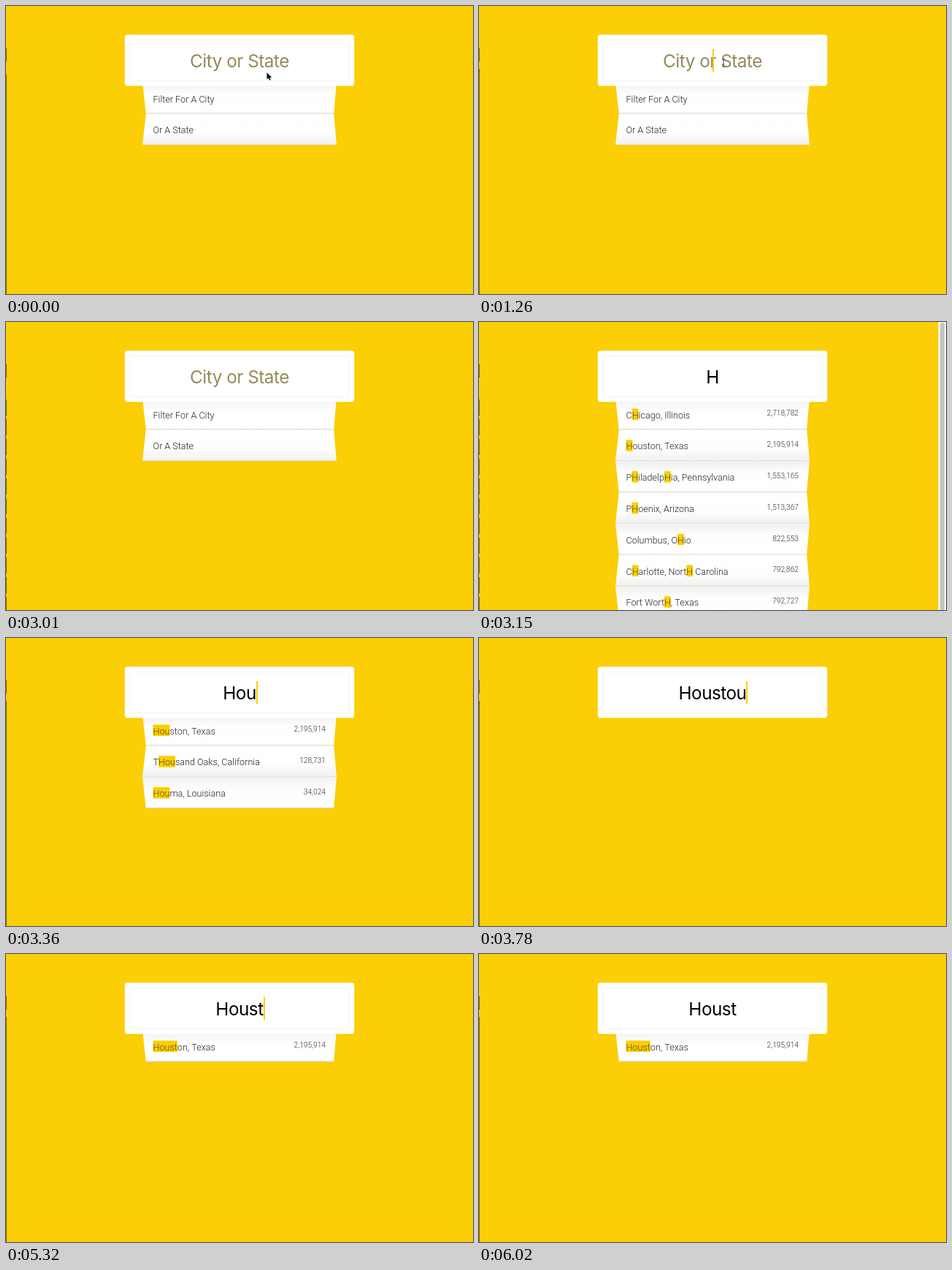
An HTML page with a canvas that plays this animation: 640 by 394 pixels, repeating every 6090 ms.

```html
<!DOCTYPE html>
<html lang="en">
<head>
<meta charset="utf-8">
<title>City or State</title>
<style>
  html, body { margin: 0; width: 100%; height: 100%; overflow: hidden; background: #fbce05; }
  canvas { display: block; width: 640px; height: 394px; }
</style>
</head>
<body>
<canvas id="stage" width="640" height="394"></canvas>
<script>
const ctx = document.getElementById('stage').getContext('2d');
const LOOP = 6090;
const YELLOW = '#fbce05';
const INPUT_FONT = '24.3px Inter, sans-serif';
const ROW_FONT = '300 12.6px Roboto, sans-serif';
const COUNT_FONT = '300 10.2px Roboto, sans-serif';
const ROW_TOP = 104.5, ROW_STEP = 42.8;

const cities = [
  ['Chicago, Illinois', '2,718,782'],
  ['Houston, Texas', '2,195,914'],
  ['Philadelphia, Pennsylvania', '1,553,165'],
  ['Phoenix, Arizona', '1,513,367'],
  ['Columbus, Ohio', '822,553'],
  ['Charlotte, North Carolina', '792,862'],
  ['Fort Worth, Texas', '792,727'],
  ['Oklahoma City, Oklahoma', '610,613'],
  ['Tulsa, Oklahoma', '398,121'],
  ['Honolulu, Hawaii', '347,884'],
  ['Boise City, Idaho', '214,237'],
  ['Thousand Oaks, California', '128,731'],
  ['Houma, Louisiana', '34,024']
];
const hints = [['Filter For A City', ''], ['Or A State', '']];

// [time, length of the typed word]
const WORD = 'Houstous';
const keys = [
  [0, 0], [3150, 1], [3290, 2], [3360, 3], [3500, 4], [3570, 5], [3710, 6],
  [3780, 7], [3920, 8], [4970, 7], [5110, 6], [5250, 5]
];
const caretOn = [[1190, 1820], [2380, 2870], [3220, 4410], [4970, 5600]];

const within = (t, [from, to]) => t >= from && t < to;
const ease = p => p * p * (3 - 2 * p);
const progress = (t, from, to) => ease(Math.min(1, Math.max(0, (t - from) / (to - from))));

function typedAt(t) {
  const [, length] = keys.filter(([at]) => t >= at).pop();
  return WORD.slice(0, length);
}

function drawText(text, x, y, font, color, align = 'left') {
  ctx.font = font;
  ctx.fillStyle = color;
  ctx.textAlign = align;
  ctx.fillText(text, x, y);
}

function polygon(points) {
  ctx.beginPath();
  points.forEach(([x, y]) => ctx.lineTo(x, y));
  ctx.closePath();
}

function drawHighlighted(name, query, x, y) {
  ctx.font = ROW_FONT;
  const parts = query ? name.split(new RegExp(`(${query})`, 'i')) : [name];
  parts.forEach((part, i) => {
    const marked = i % 2 === 1;
    const text = marked ? query : part;
    const width = ctx.measureText(text).width;
    if (marked) {
      ctx.fillStyle = YELLOW;
      ctx.fillRect(x, y - 13, width, 15.5);
    }
    drawText(text, x, y, ROW_FONT, marked ? '#5c4c10' : '#222222');
    x += width;
  });
}

function drawRow([name, count], index, query) {
  const top = ROW_TOP + index * ROW_STEP;
  const bottom = top + ROW_STEP;
  const narrowBottom = index % 2 === 0;
  const wide = [187, 453], narrow = [191.8, 449.2];
  const [head, foot] = narrowBottom ? [wide, narrow] : [narrow, wide];

  const shade = ctx.createLinearGradient(0, top, 0, bottom);
  shade.addColorStop(narrowBottom ? 0 : 1, '#f0f0f0');
  shade.addColorStop(narrowBottom ? 0.4 : 0.6, '#fefefe');
  shade.addColorStop(narrowBottom ? 1 : 0, '#ffffff');

  polygon([[head[0], top], [head[1], top], [foot[1], bottom], [foot[0], bottom]]);
  ctx.fillStyle = shade;
  ctx.fill();
  ctx.fillStyle = narrowBottom ? '#d2d2d2' : '#e2e2e2';
  ctx.fillRect(foot[0], bottom - 1, foot[1] - foot[0], 1);

  drawHighlighted(name, query, 201.5, top + 27);
  drawText(count, 438, top + 23.8, COUNT_FONT, '#333333', 'right');
}

function drawInput(typed, showCaret) {
  ctx.fillStyle = '#ffffff';
  ctx.strokeStyle = 'rgba(255, 255, 255, 0.5)';
  ctx.lineWidth = 1;
  ctx.beginPath();
  ctx.roundRect(163, 39.5, 314, 69.5, 3);
  ctx.fill();
  ctx.stroke();
  ctx.strokeStyle = '#f4f4f4';
  ctx.strokeRect(169.5, 46.5, 301, 56);

  ctx.letterSpacing = '-0.5px';
  drawText(typed || 'City or State', 320, 84, INPUT_FONT, typed ? '#000000' : '#968a58', 'center');
  const caretX = 320 + ctx.measureText(typed).width / 2;
  ctx.letterSpacing = '0px';

  if (showCaret) {
    ctx.fillStyle = YELLOW;
    ctx.fillRect(Math.round(caretX), 59, 2, 31);
  }
}

function drawArrow(x, y) {
  polygon([[0, 0], [0, 9.5], [2.2, 7.5], [3.7, 10.8], [5.3, 10.1], [3.9, 7], [6.8, 6.8]]
    .map(([dx, dy]) => [x + dx, y + dy]));
  ctx.strokeStyle = '#ffffff';
  ctx.lineWidth = 1.4;
  ctx.stroke();
  ctx.fillStyle = '#111111';
  ctx.fill();
}

function drawBeam(x, y) {
  ctx.strokeStyle = '#444444';
  ctx.lineWidth = 1;
  ctx.beginPath();
  ctx.moveTo(x - 2, y - 5.5);
  ctx.lineTo(x, y - 4.5);
  ctx.lineTo(x + 2, y - 5.5);
  ctx.moveTo(x, y - 4.5);
  ctx.lineTo(x, y + 4.5);
  ctx.moveTo(x - 2, y + 5.5);
  ctx.lineTo(x, y + 4.5);
  ctx.lineTo(x + 2, y + 5.5);
  ctx.stroke();
}

function drawPointer(t) {
  if (t >= 1400) return;
  const p = progress(t, 560, 1120);
  const x = 357.5 - 22.5 * p, y = 91 - 13 * p;
  if (t < 700) drawArrow(x, y);
  else drawBeam(x, y);
}

function drawWindowEdge(t) {
  const dashed = within(t, [2170, 3360]);
  ctx.save();
  ctx.strokeStyle = '#7d6808';
  ctx.lineWidth = 1;
  ctx.setLineDash(dashed ? [22, 5] : []);
  ctx.beginPath();
  ctx.moveTo(0.5, t < 1190 ? 93 : dashed ? 106 : 86);
  ctx.lineTo(0.5, 394);
  ctx.moveTo(0.5, 58);
  ctx.lineTo(0.5, 76);
  ctx.stroke();
  ctx.restore();
}

function drawScrollbar() {
  ctx.fillStyle = '#f7f7f7';
  ctx.fillRect(629.5, 0, 10.5, 394);
  ctx.fillStyle = '#c4c4c4';
  ctx.beginPath();
  ctx.roundRect(632, 1, 6, 400, 3);
  ctx.fill();
}

function render(t) {
  const typed = typedAt(t);
  const matches = typed
    ? cities.filter(([name]) => name.toLowerCase().includes(typed.toLowerCase()))
    : hints;

  ctx.fillStyle = YELLOW;
  ctx.fillRect(0, 0, 640, 394);
  drawWindowEdge(t);
  matches.slice(0, 7).forEach((row, i) => drawRow(row, i, typed));
  drawInput(typed, caretOn.some(span => within(t, span)));
  drawPointer(t);
  if (typed.length === 1 || typed.length === 2) drawScrollbar();
}

const start = performance.now();
function tick() {
  render((performance.now() - start) % LOOP);
  requestAnimationFrame(tick);
}
tick();
</script>
</body>
</html>
```
